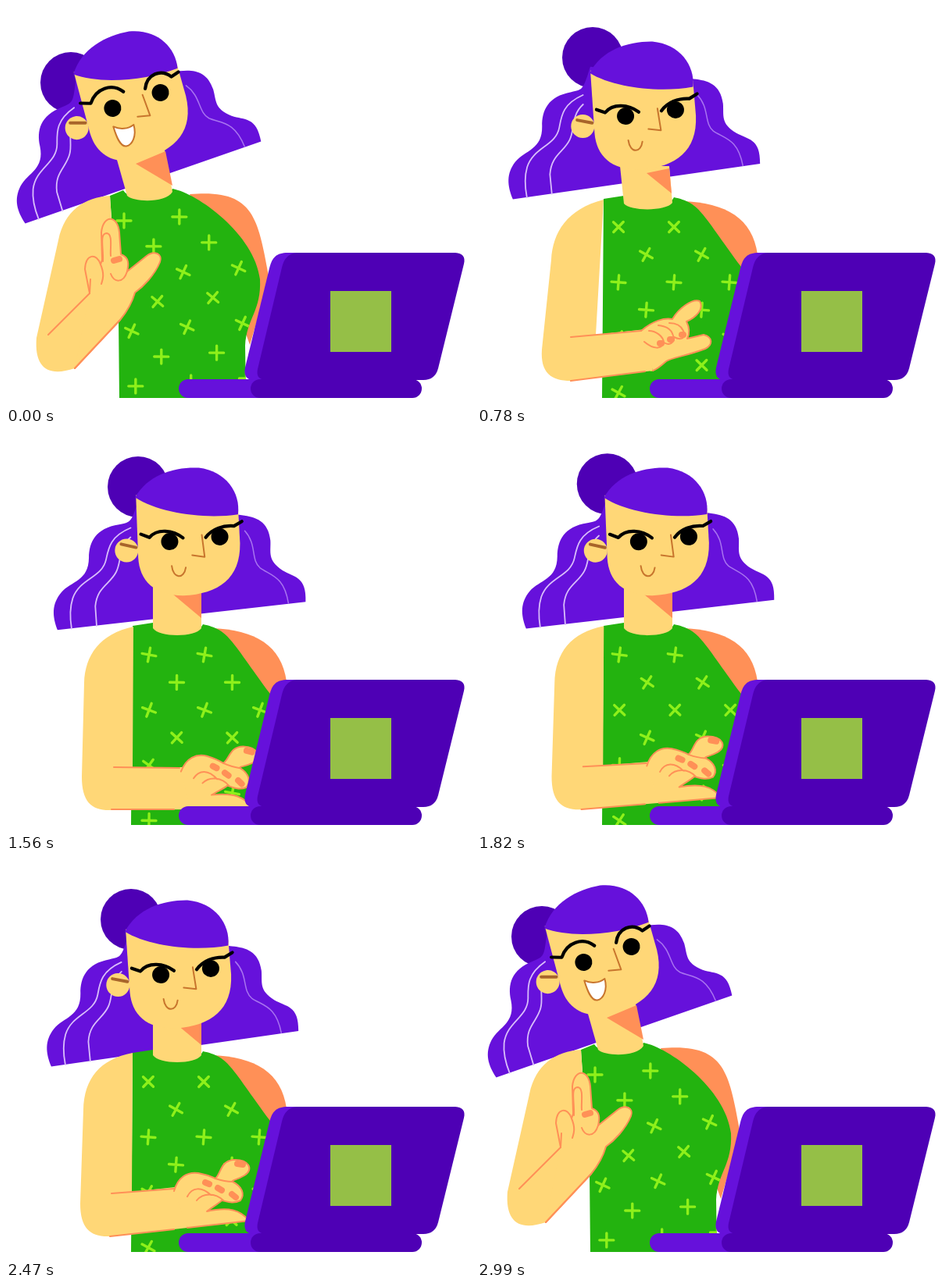
These frames come from a looping animation (595 by 511 pixels, 3120 ms). An HTML page with a canvas:

```html
<!DOCTYPE html>
<html lang="en">
<head>
<meta charset="utf-8">
<title>Waving and typing</title>
<style>
html, body { margin: 0; height: 100%; overflow: hidden; background: #fff; }
canvas { display: block; }
</style>
</head>
<body>
<canvas id="stage" width="595" height="511"></canvas>
<script>
const ctx = document.getElementById('stage').getContext('2d');
const LOOP = 3120, STEP = 130;
const SKIN = '#ffd777', CORAL = '#ff9057', VIOLET = '#6611db', INDIGO = '#4e00b5';
const GREEN = '#23b30f', LIME = '#8ef01a', BROWN = '#c8752d';

// Every pose shares one path structure, so any two can be blended.
const wideBrows = 'M165 124L178 127C188 109 210 107 222 121M250 123C256 105 275 102 286 115L296 111';
const lowBrows = 'M167 130L178 134C188 122 208 124 221 134M250 133C258 122 272 117 286 118L296 112';
const seated = {
  body: 'M162 247L188 243C196 262 244 262 252 245C285 252 285 262 338 334C350 370 345 400 335 440L340 502L160 502L161 380Z',
  shoulder: 'M262 250C320 252 352 272 359 318L338 336L300 300Z',
  neck: 'M188 195L188 250C196 262 242 262 250 250L250 195Z',
  shade: 'M213 206L250 237L250 202Z',
  brows: lowBrows
};
const poses = {
  wave: {
    body: 'M133 243L150 236C160 252 205 252 213 234C245 240 318 292 325 350C327 390 308 400 306 435L307 502L145 502L144 400Z',
    shoulder: 'M235 241C318 234 322 270 337 350L312 434L300 400Z',
    neck: 'M140 190L155 243C165 252 205 252 213 238L203 185Z',
    shade: 'M166 202L213 230L204 186Z',
    arm: 'M133 243C100 245 75 262 67 300L39 425C36 465 55 475 88 464L165 367L125 330L138 320Z',
    cuff: 'M54 421L107 368M88 464L146 402',
    brows: wideBrows
  },
  lean: {
    body: 'M180 252L205 250C215 285 255 288 265 264C290 272 318 320 318 365C316 405 288 425 292 450L292 502L136 502L132 390Z',
    shoulder: 'M255 266C300 256 338 290 342 320L310 446L302 400Z',
    neck: 'M206 240L203 276C215 286 255 288 266 270L262 240Z',
    shade: 'M252 264L277 273L264 256Z',
    arm: 'M180 252C140 252 115 265 95 300L25 395C12 420 22 446 64 444L160 370L150 310L160 300Z',
    cuff: 'M40 394L105 352M64 444L160 370',
    brows: wideBrows
  },
  type: {
    ...seated,
    arm: 'M162 247C120 255 100 280 99 320L95 440C95 472 108 483 133 482L232 471L225 418L161 425Z',
    cuff: 'M135 427L215 421M133 482L215 473'
  },
  press: {
    ...seated,
    arm: 'M163 248C120 257 101 285 100 320L97 440C97 473 110 484 135 483L236 482L230 428L162 428Z',
    cuff: 'M138 428L222 429M135 482L215 482'
  },
  lift: {
    ...seated,
    neck: 'M183 205L188 253C196 263 242 263 250 252L246 205Z',
    shade: 'M217 214L249 240L246 208Z',
    arm: 'M162 248C115 260 97 290 95 325L83 440C81 470 95 480 120 480L225 467L215 414L152 421Z',
    cuff: 'M120 424L210 416M120 480L215 468'
  }
};

const hands = {
  wave: {
    edge: 'M107 368L101 337C102 317 116 316 121 331L123 325L122 290C124 267 143 267 145 290L147 318C158 322 157 331 155 340L180 320C190 312 201 318 197 328C190 345 175 360 165 367Q160 385 146 402L88 464',
    lines: 'M124 327C125 310 119 291 129 291C137 292 133 310 134 320M121 331C127 345 123 352 122 356M155 340C150 356 138 354 134 343M107 368L108 350',
    nails: 'M138 326l7-2'
  },
  lean: {
    edge: 'M105 353C102 335 108 322 120 320C120 300 125 290 133 291C143 293 142 305 138 318C150 305 160 300 168 306C185 307 196 313 192 319C186 325 178 327 172 333C188 325 200 328 205 335C207 343 190 352 180 358Q170 366 160 370L125 380',
    lines: 'M120 320C132 318 140 325 138 334C136 342 127 344 125 354M138 318C146 319 150 313 155 312M152 332C160 322 178 320 188 320M135 340L134 350',
    nails: 'M126 324l5 0M130 297l4 1M157 308l5 0M183 315l6 0'
  },
  type: {
    edge: 'M215 424C220 406 232 399 246 401C256 403 262 405 268 408C276 400 274 386 291 384C310 383 318 396 305 404C295 410 288 410 290 412C302 418 306 428 300 436C290 441 282 437 276 436C272 440 262 446 257 450C285 444 300 448 311 462L232 471',
    lines: 'M232 431C238 419 250 418 262 429M244 436C252 426 268 426 278 436M268 408Q280 412 290 412',
    nails: 'M296 389l7 1M255 413l5 2M271 420l5 3M289 428l5 4'
  },
  lift: {
    edge: 'M210 416C225 403 240 399 250 401C258 387 276 374 285 378C291 388 280 399 268 404C272 412 272 420 269 426L290 421C302 424 302 434 292 439C265 449 250 450 242 455C232 464 228 466 225 467',
    lines: 'M214 430C226 440 236 440 239 431C238 422 228 416 220 416M239 431C247 436 254 430 251 422C248 412 240 410 232 409M252 424C262 429 268 425 264 416C260 407 252 406 246 406',
    nails: 'M234 432l2 0M247 427l2 0M262 421l2 0'
  }
};
hands.press = hands.type;

const mouths = {
  wave: 'M200 162C208 168 218 169 226 165C227 180 219 190 211 190C203 189 201 175 200 162Z',
  lean: 'M195 161C203 166 215 168 227 165C227 173 217 180 209 178C200 176 195 170 195 161Z',
  calm: 'M207 170C209 187 223 187 225 172'
};

// pose, time, eyes x y, head turn, skull shift x y, hair drop, bun x y, print x y turn, row of most tilted crosses
const start = ['wave', 0, 167, 121, -12, 5, 3, 17, 83, 98, 151, 275, -4, 3];
const keys = [
  start,
  ['lean', 390, 272.5, 204, 7, 0, -11, 4, 205, 122, 164, 283, 0, 1.7],
  ['lift', 780, 222, 137, -1, 0, 0, 0, 148, 66, 181, 283, 0, 0],
  ['type', 1040, 236, 135.5, 0, 0, 0, 0, 158, 65, 181, 283, 0, -.8],
  ['press', 1300, 246, 131, 1, 0, 0, 6, 172, 61, 183, 284, 0, -1.2],
  ['press', 1560, 241.5, 136, .7, 0, 0, 11, 169, 69, 183, 284, 0, -1.7],
  ['type', 1950, 238, 136, .5, 0, 0, 8, 166, 64, 182, 284, 0, -3.7],
  ['lift', 2210, 229.5, 145, .5, 0, 0, 11, 167, 74, 181, 284, 0, -5],
  ['type', 2470, 230, 143, -1, 0, 0, 11, 160, 76, 182, 284, 0, -5],
  ['press', 2730, 227, 143.5, -2.5, 0, 0, 11, 150, 81, 183, 284, 0, -5],
  ['wave', 2990, ...start.slice(2)]
];

const rad = deg => deg * Math.PI / 180;
const lerp = (a, b, k) => a + (b - a) * k;
const numbers = path => path.match(/-?[\d.]+/g).map(Number);
function blend(a, b, k) {
  const ends = numbers(b);
  let i = 0;
  return a.replace(/-?[\d.]+/g, n => lerp(+n, ends[i++], k).toFixed(2));
}
function fill(path, color) {
  ctx.fillStyle = color;
  ctx.fill(new Path2D(path));
}
function line(path, color, width) {
  ctx.strokeStyle = color;
  ctx.lineWidth = width;
  ctx.stroke(new Path2D(path));
}
function disc(x, y, r, color) {
  ctx.fillStyle = color;
  ctx.beginPath();
  ctx.arc(x, y, r, 0, 7);
  ctx.fill();
}
function within(draw) {
  ctx.save();
  draw();
  ctx.restore();
}

function enterHead(x, y, turn, dx, dy) {
  ctx.translate(x, y);
  ctx.rotate(rad(turn));
  ctx.translate(dx - 236, dy - 135.5);
}

function drawHair() {
  fill('M160 75C150 105 150 104 135 107C105 112 97 130 97 150C97 180 75 180 62 195C50 210 51 225 58 243L375 203C376 170 360 172 345 163C325 150 330 140 329 125C326 100 310 95 292 93Z', VIOLET);
  line('M150 111C124 122 122 137 119 152C114 176 86 176 77 202Q72 218 76 241M150 123C134 137 139 155 132 168C124 184 108 187 106 212L108 237', '#d9bdfb', 1.8);
  line('M296 113C312 130 304 150 316 160C330 170 347 170 353 205', '#a873f0', 1.5);
}

function drawSkull() {
  disc(149, 151, 15, SKIN);
  fill('M160 80L164 160C166 190 185 208 222 208C268 205 295 185 294 140L291 95Z', SKIN);
  line('M142 143L161 147', '#a8652a', 4);
  fill('M159 83C175 53 210 43 240 44C275 48 294 75 291 103C250 110 190 103 159 83Z', VIOLET);
}

function drawFeatures(brows, mouth) {
  disc(204, 139, 11, '#000');
  disc(268, 132, 11, '#000');
  line(brows, '#000', 4.2);
  line('M245 130L249 158L233 156', BROWN, 2);
  if (mouth !== mouths.calm) fill(mouth, '#fff');
  line(mouth, BROWN, 2);
}

// A wave of tilt travels over the rows of crosses.
function drawPrint(body, x, y, turn, peak) {
  ctx.clip(new Path2D(body));
  ctx.translate(x, y);
  ctx.rotate(rad(turn));
  for (let row = -1; row < 8; row++) {
    for (let col = -1; col < 4; col++) {
      within(() => {
        ctx.translate(col * 71 + (row & 1) * 35.5, row * 35.4);
        ctx.rotate(rad(22 + 22 * Math.cos((row - peak) * Math.PI * 2 / 5)));
        line('M-9 0H9M0-9V9', LIME, 3.4);
      });
    }
  }
}

// Pin the hand to the wrist and turn it with the forearm.
function drawHand(name, arm) {
  const [ex, ey, wx, wy] = numbers(arm).slice(14, 18);
  const [rex, rey, rwx, rwy] = numbers(poses[name === 'press' ? 'type' : name].arm).slice(14, 18);
  const hand = hands[name];
  ctx.translate(wx, wy);
  ctx.rotate(Math.atan2(wy - ey, wx - ex) - Math.atan2(rwy - rey, rwx - rex));
  ctx.translate(-rwx, -rwy);
  fill(hand.edge, SKIN);
  line(hand.edge, CORAL, 2);
  line(hand.lines, CORAL, 2);
  line(hand.nails, CORAL, 8);
}

function drawLaptop() {
  ctx.fillStyle = VIOLET;
  ctx.beginPath();
  ctx.roundRect(221, 478, 130, 24, 12);
  ctx.fill();
  fill('M380 316H358C344 317 340 324 337 336L306 463Q303 478 316 479H360Z', VIOLET);
  fill('M372 316H575Q589 317 586 330L553 464Q549 479 534 479H334Q319 479 322 465L353 335Q357 317 372 316Z', INDIGO);
  ctx.fillStyle = INDIGO;
  ctx.beginPath();
  ctx.roundRect(313, 478, 219, 24, 12);
  ctx.fill();
  ctx.fillStyle = '#95bf47';
  ctx.fillRect(415, 365, 78, 78);
}

function draw(t) {
  let i = 0;
  while (i < keys.length - 2 && keys[i + 1][1] <= t) i++;
  const a = keys[i], b = keys[i + 1];
  const p = Math.min(1, (t - a[1]) / (b[1] - a[1]));
  const k = p * p * (3 - 2 * p);
  const [x, y, turn, skullX, skullY, hair, bunX, bunY, ...print] =
    a.slice(2).map((v, n) => lerp(v, b[n + 2], k));
  const near = k < .5 ? a[0] : b[0];
  const part = name => blend(poses[a[0]][name], poses[b[0]][name], k);
  const body = part('body'), arm = part('arm');

  ctx.fillStyle = '#fff';
  ctx.fillRect(0, 0, 595, 511);
  ctx.lineCap = ctx.lineJoin = 'round';
  disc(bunX, bunY, 39, INDIGO);
  within(() => { enterHead(x, y, turn, hair * .35, hair); drawHair(); });
  fill(part('shoulder'), CORAL);
  fill(body, GREEN);
  within(() => drawPrint(body, ...print));
  fill(part('neck'), SKIN);
  fill(part('shade'), CORAL);
  within(() => { enterHead(x, y, turn, skullX, skullY); drawSkull(); });
  within(() => {
    enterHead(x, y, turn, 0, 0);
    drawFeatures(part('brows'), mouths[near] || mouths.calm);
  });
  fill(arm, SKIN);
  within(() => drawHand(near, arm));
  line(part('cuff'), CORAL, 2);
  drawLaptop();
}

function tick() {
  draw(Math.floor(performance.now() % LOOP / STEP) * STEP);
  requestAnimationFrame(tick);
}
tick();
</script>
</body>
</html>
```
